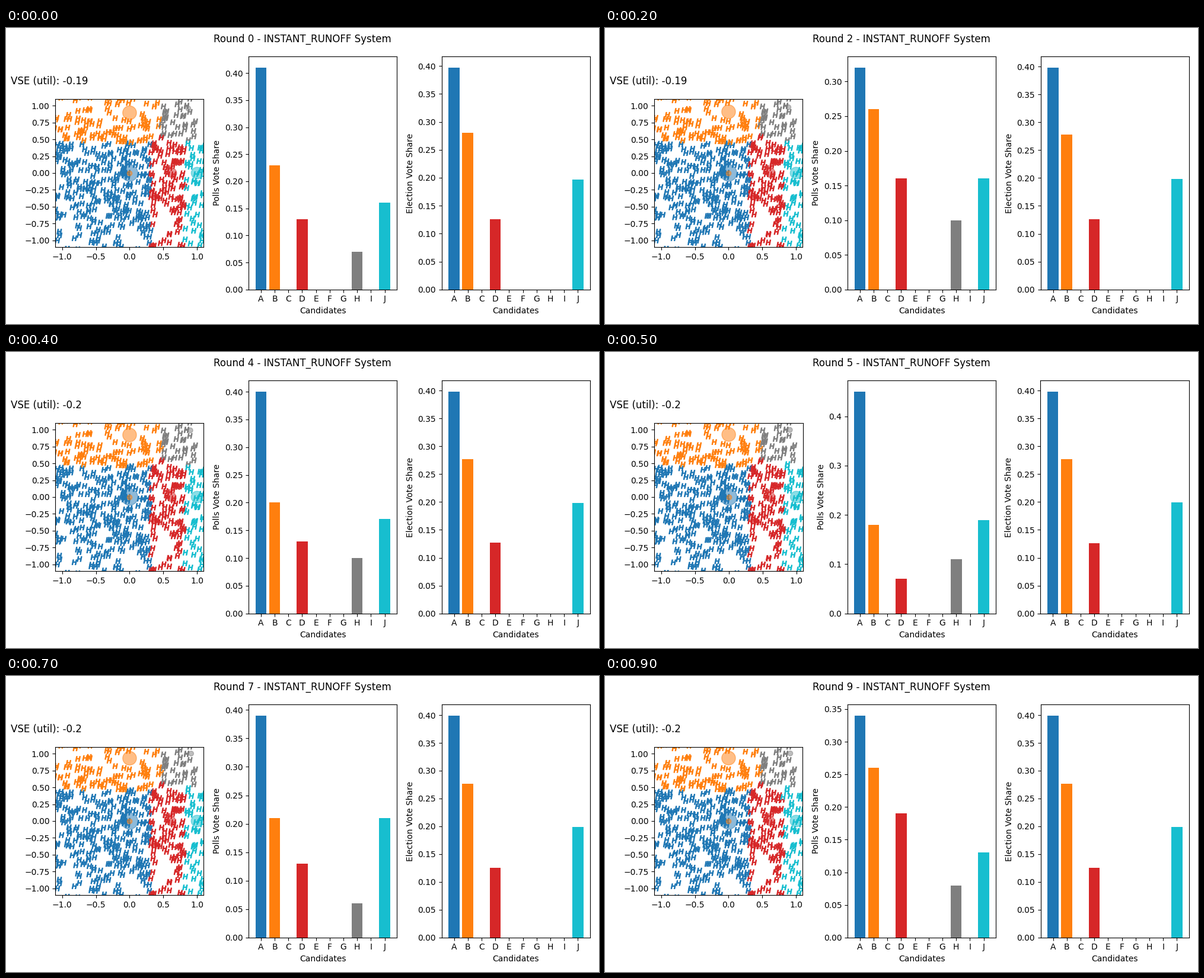
Write a matplotlib script that moves like this. It is 1000 by 500 pixels and loops after 1 s.

```python
import numpy as np
import matplotlib.pyplot as plt
from matplotlib.animation import FuncAnimation

NAMES = list("ABCDEFGHIJ")
ACTIVE = [0, 1, 3, 7, 9]
COLORS = plt.get_cmap("tab10").colors
MARGINS = dict(left=0.125, right=0.9, bottom=0.11, top=0.88, wspace=0.2)

# Poll results of A, B, D, H in percent; J gets the rest
POLLS = [(41, 23, 13, 7), (37, 25, 14, 8), (32, 26, 16, 10), (45, 23, 9, 8),
         (40, 20, 13, 10), (45, 18, 7, 11), (36, 22, 15, 6), (39, 21, 13, 6),
         (42, 20, 11, 5), (34, 26, 19, 8)]


def poll_shares(i):
    return np.array([*POLLS[i], 100 - sum(POLLS[i])]) / 100


def vote_shares(i):
    """A and J slowly gain on B; H is always eliminated."""
    a = round(397.3 + 0.2 * i)
    b = round(277 + 3 * np.exp(-0.5 * i))
    j = round(199 - 2 * np.exp(-0.3 * i))
    return np.array([a, b, 1000 - a - b - j, 0, j]) / 1000


def candidates(i):
    """Positions of A, B, D, H, J as they drift over the rounds."""
    ease = 1 - (1 - i / 9) ** 2
    return np.array([(0, 0),
                     (0, 0.895 + 0.04 * ease),
                     (0.63 - 0.015 * ease, 0),
                     (0.87 + 0.045 * ease, 0.96 + 0.045 * ease),
                     (1, 0)])


def draw_map(ax, i):
    ax.clear()
    pos = candidates(i)
    dist = np.linalg.norm(voters[:, None] - pos, axis=2)
    ax.scatter(*voters.T, marker="$H$", c=colors[dist.argmin(axis=1)])
    ax.scatter(*pos.T, s=np.maximum(1000 * vote_shares(i), 36), c=colors,
               alpha=0.5)
    ax.scatter(0, 0, s=36, color=COLORS[1], alpha=0.5)
    ax.set(xlim=(-1.1, 1.1), ylim=(-1.1, 1.1), aspect="equal")
    vse = round(-0.192 - 0.0008 * i, 2)
    ax.text(-0.3, 1.1, f"VSE (util): {vse}", fontsize=12,
            transform=ax.transAxes)


def draw_bars(ax, shares, label):
    ax.clear()
    heights = np.zeros(len(NAMES))
    heights[ACTIVE] = shares
    ax.bar(NAMES, heights, color=COLORS)
    ax.set(xlabel="Candidates", ylabel=label)


def update(i):
    fig.subplots_adjust(**MARGINS)
    fig.suptitle(f"Round {i} - INSTANT_RUNOFF System")
    draw_map(ax_map, i)
    draw_bars(ax_polls, poll_shares(i), "Polls Vote Share")
    draw_bars(ax_votes, vote_shares(i), "Election Vote Share")
    fig.tight_layout()


colors = np.array(COLORS)[ACTIVE]
voters = np.random.default_rng(0).normal(size=(1000, 2))

fig, (ax_map, ax_polls, ax_votes) = plt.subplots(1, 3, figsize=(10, 5), dpi=100)
anim = FuncAnimation(fig, update, frames=len(POLLS), interval=100,
                     init_func=lambda: None, repeat=True, repeat_delay=0)
plt.show()
```
